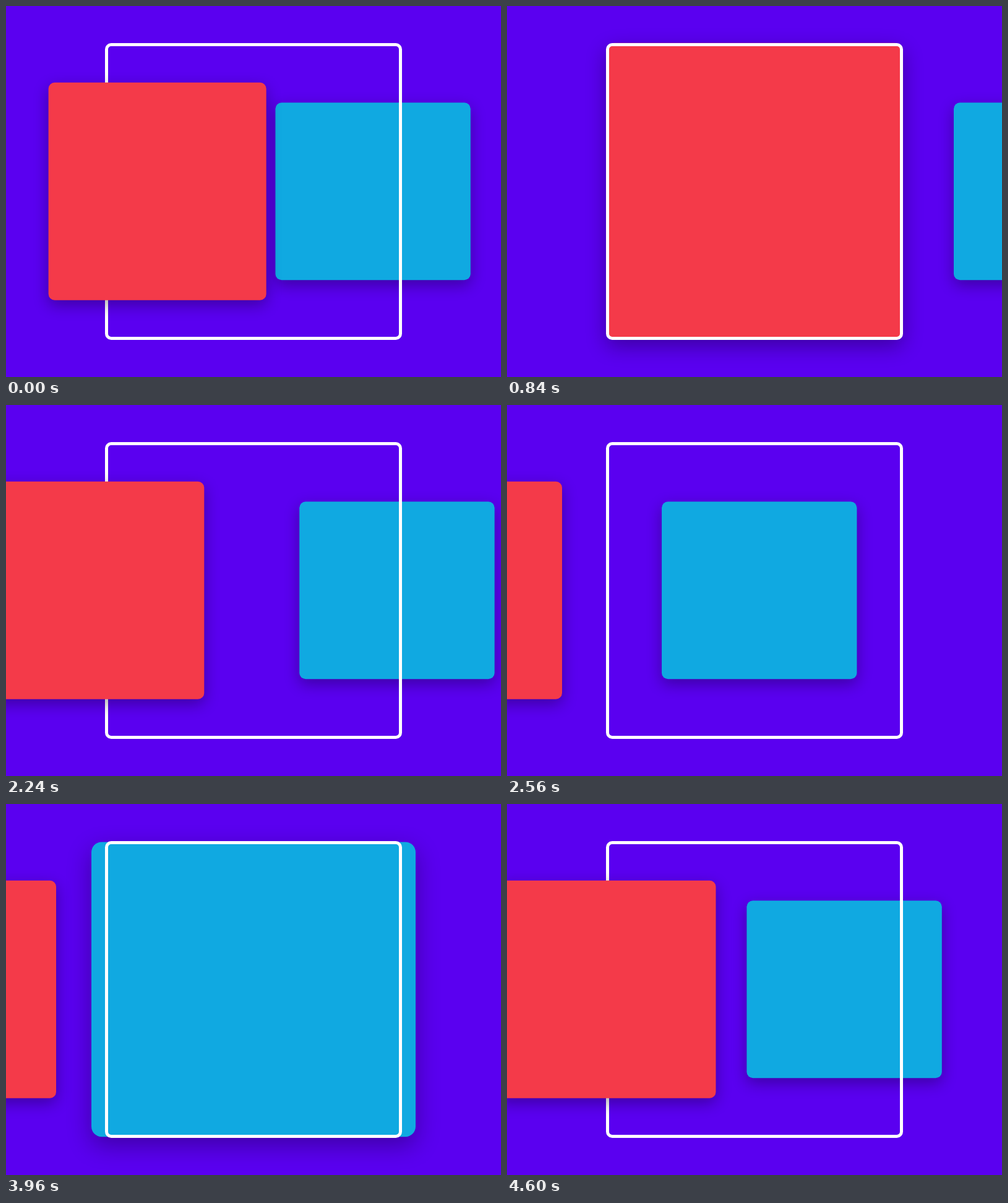
Animation, 800 px wide and 600 px high, one loop 4640 ms. Source, as an HTML page with a canvas:

```html
<!DOCTYPE html>
<html lang="en">
<head>
<meta charset="utf-8">
<title>Squares</title>
<style>
html, body { margin: 0; width: 100%; height: 100%; overflow: hidden; background: #5a00f0; }
canvas { display: block; }
</style>
</head>
<body>
<canvas id="stage" width="800" height="600"></canvas>
<script>
const ctx = document.getElementById('stage').getContext('2d');
const LOOP = 4640, STEP = 40;
const CY = 299.8;

const RED = { color: '#f43a49', w: 352, h: 352, home: 400, away: -95, full: 480 / 352 };
const BLUE = { color: '#10a9e1', w: 315.4, h: 287, home: 400, away: 879.7, full: 480 / 287 };

// Phases as [start, duration]; those before 0 wrap from the end of the loop.
const SLIDE_RIGHT = [-161, 400], RED_GROW = [170, 680];
const RED_SHRINK = [1506, 500], SLIDE_LEFT = [2059, 600];
const BLUE_GROW = [2592, 680], BLUE_SHRINK = [3945, 500];

const mix = (a, b, p) => a + (b - a) * p;
const linear = p => p;

// cubic-bezier(.25, .1, .25, 1), solved by bisection
function ease(p) {
  if (p <= 0 || p >= 1) return p;
  let lo = 0, hi = 1;
  for (let i = 0; i < 30; i++) {
    const u = (lo + hi) / 2;
    if (0.75 * u * (1 - u) + u * u * u < p) lo = u; else hi = u;
  }
  const v = 1 - lo;
  return 0.3 * v * v * lo + 3 * v * lo * lo + lo * lo * lo;
}

function progress(t, [start, length], curve = ease) {
  return curve(Math.min(1, Math.max(0, (t - start) / length)));
}

function card({ color, w, h }, x, scale) {
  ctx.save();
  ctx.shadowColor = 'rgba(0, 0, 0, 0.32)';
  ctx.shadowOffsetY = 8 * scale;
  ctx.shadowBlur = 24 * scale;
  ctx.fillStyle = color;
  ctx.beginPath();
  ctx.roundRect(x - w * scale / 2, CY - h * scale / 2, w * scale, h * scale, 10 * scale);
  ctx.fill();
  ctx.restore();
}

function frame() {
  ctx.strokeStyle = '#fff';
  ctx.lineWidth = 5;
  ctx.beginPath();
  ctx.roundRect(162.5, 62.5, 475, 475, 7.5);
  ctx.stroke();
}

function draw(time) {
  let t = Math.floor((time % LOOP) / STEP) * STEP;
  if (t >= LOOP + SLIDE_RIGHT[0]) t -= LOOP;

  const left = t >= SLIDE_LEFT[0];
  const slide = left ? SLIDE_LEFT : SLIDE_RIGHT;
  const place = (c, p, out) => out ? mix(c.home, c.away, p) : mix(c.away, c.home, p);
  const redX = place(RED, progress(t, slide), left);
  const blueX = place(BLUE, progress(t, slide, left ? ease : linear), !left);

  const size = (c, grow, shrink) => mix(1, c.full, progress(t, grow) - progress(t, shrink));
  const redScale = size(RED, RED_GROW, RED_SHRINK);
  const blueScale = size(BLUE, BLUE_GROW, BLUE_SHRINK);

  ctx.fillStyle = '#5a00f0';
  ctx.fillRect(0, 0, 800, 600);
  card(BLUE, blueX, blueScale);
  // The red card sits behind the frame only while it is selected.
  const behind = t >= RED_GROW[0] && !left;
  if (behind) card(RED, redX, redScale);
  frame();
  if (!behind) card(RED, redX, redScale);
}

const begin = performance.now();
function tick() {
  draw(performance.now() - begin);
  requestAnimationFrame(tick);
}
tick();
</script>
</body>
</html>
```
